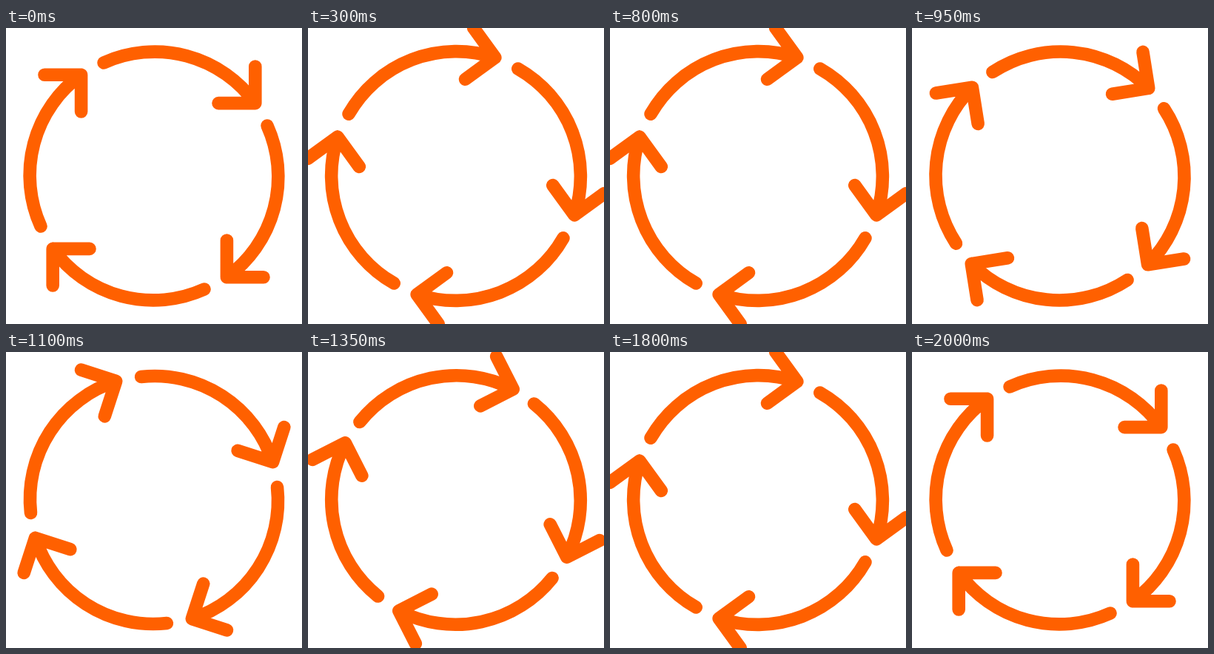
An HTML page for the animation above (2.02 s loop, 400 by 400 pixels).

```html
<!DOCTYPE html>
<html lang="en">
<head>
<meta charset="utf-8">
<title>Rotating arrows</title>
<style>
  html, body { margin: 0; width: 100%; height: 100%; overflow: hidden; background: #fff; }
  svg { display: block; width: 100vw; height: 100vh; }
</style>
</head>
<body>
<svg viewBox="-200 -200 400 400">
  <defs>
    <path id="arrow" d="M-68-153A167.5 167.5 0 0 1 136.8-98.4M87-98.4H136.8V-148"/>
  </defs>
  <g id="ring" fill="none" stroke="#ff6000" stroke-width="17.6" stroke-linecap="round" stroke-linejoin="round">
    <use href="#arrow"/>
    <use href="#arrow" transform="rotate(90)"/>
    <use href="#arrow" transform="rotate(180)"/>
    <use href="#arrow" transform="rotate(270)"/>
  </g>
</svg>
<script>
  const LOOP = 2020, STEP_MS = 25, STEP_DEG = 4.5;
  const ring = document.getElementById('ring');
  const start = performance.now();

  function draw() {
    const t = (performance.now() - start) % LOOP;
    // Steps alternate between 20 and 30 ms, 80 to a full turn.
    const step = Math.floor((Math.floor(t / 10) * 10 + 5) / STEP_MS);
    ring.setAttribute('transform', `rotate(${step * STEP_DEG})`);
    requestAnimationFrame(draw);
  }
  draw();
</script>
</body>
</html>
```
